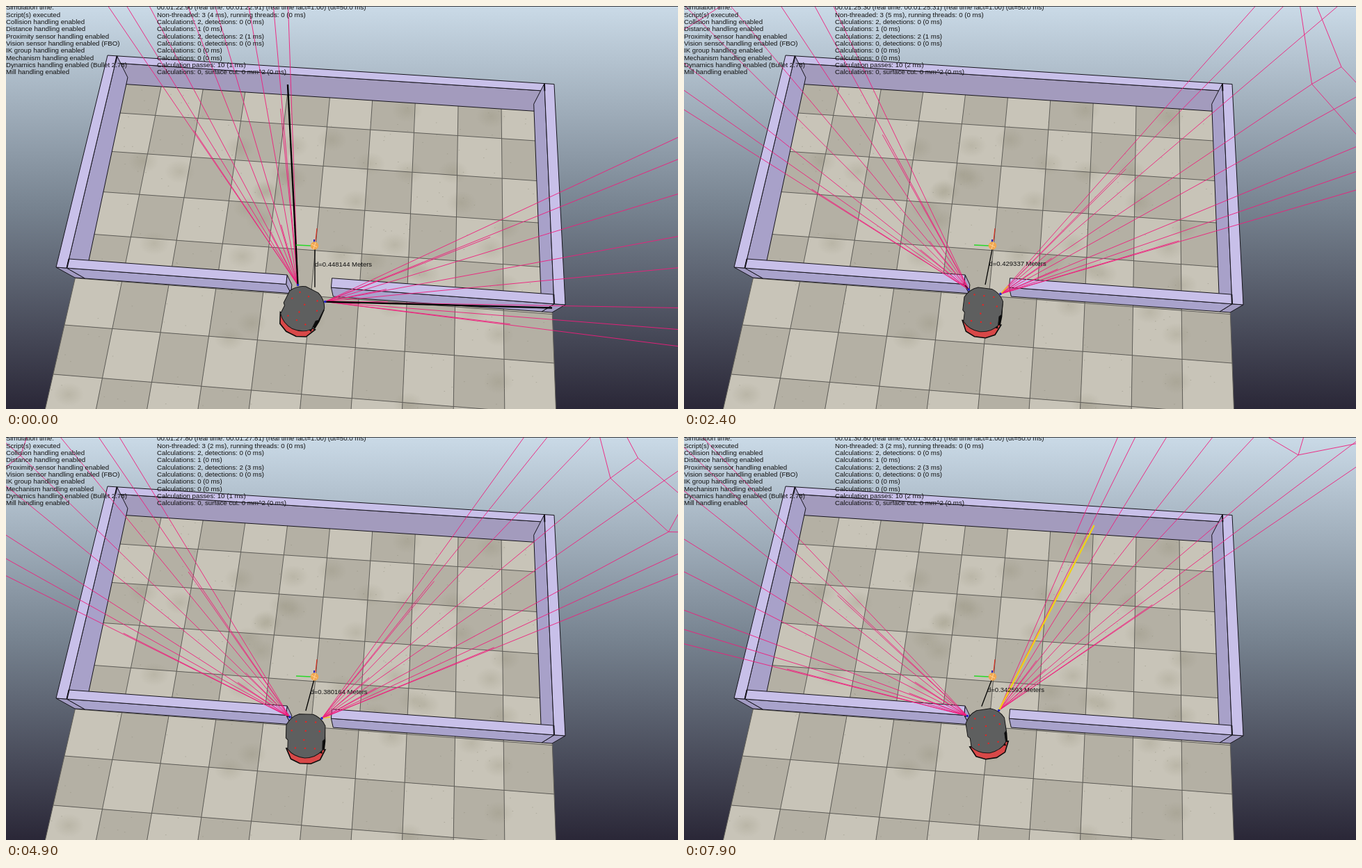
An HTML page for the animation above (8 s loop, 966x580 px).

```html
<!DOCTYPE html>
<html lang="en">
<head>
<meta charset="utf-8">
<title>Robot in a doorway</title>
<style>
html, body { margin: 0; width: 100%; height: 100%; overflow: hidden; background: #2b2838; }
svg { display: block; width: 966px; height: 580px; }
text { font: 9.7px "Liberation Sans", Arial, sans-serif; fill: #111; white-space: pre; }
</style>
</head>
<body>
<svg viewBox="0 0 966 580">
  <defs>
    <linearGradient id="sky" x2="0" y2="1">
      <stop stop-color="#cadae7"/><stop offset=".5" stop-color="#778390"/><stop offset="1" stop-color="#2a2737"/>
    </linearGradient>
    <radialGradient id="smudge">
      <stop stop-color="#88846c" stop-opacity=".22"/><stop offset="1" stop-color="#88846c" stop-opacity="0"/>
    </radialGradient>
  </defs>
  <rect width="966" height="580" fill="url(#sky)"/>
  <g id="floor"></g>
  <g id="walls" stroke="#16141c" stroke-linejoin="round"></g>
  <g id="rays" fill="none" stroke="#f01c7c" stroke-width=".9"></g>
  <g id="robot"></g>
  <g id="marker"></g>
  <g id="info"></g>
  <rect width="966" height="1" fill="#3a3d42"/>
</svg>
<script>
const LOOP = 8000, STEP = 100;
const byId = id => document.getElementById(id);
const poly = (points, fill) => `<polygon points="${points.join(' ')}" fill="${fill}"/>`;
const line = (a, b, extra = '') => `<path d="M${a}L${b}" ${extra}/>`;
const mix = (a, b, f) => a.map((x, i) => x + (b[i] - x) * f);
const rad = deg => deg * Math.PI / 180;

function randomFrom(seed) {
  return () => (seed = seed * 16807 % 2147483647) / 2147483647;
}

// Perspective map from the unit square to the corners a, b, c, d (clockwise).
function perspective(a, b, c, d) {
  const [dx1, dy1, dx2, dy2] = [b[0] - c[0], b[1] - c[1], d[0] - c[0], d[1] - c[1]];
  const sx = a[0] - b[0] + c[0] - d[0], sy = a[1] - b[1] + c[1] - d[1];
  const det = dx1 * dy2 - dx2 * dy1;
  const g = (sx * dy2 - dx2 * sy) / det, h = (dx1 * sy - sx * dy1) / det;
  return (s, t) => [0, 1].map(i =>
    ((b[i] * (1 + g) - a[i]) * s + (d[i] * (1 + h) - a[i]) * t + a[i]) / (g * s + h * t + 1));
}

function drawFloor() {
  const map = perspective([153.7, 153.3], [776, 195], [788, 514], [84, 459]);
  const at = (u, v) => map(u / 10, (v - 1) / 5);
  const random = randomFrom(7), grid = 'stroke="#605e58"';
  let out = '', specks = '';
  for (let v = 0; v < 8; v++) for (let u = 0; u < 10; u++) {
    out += poly([at(u, v), at(u + 1, v), at(u + 1, v + 1), at(u, v + 1)], (u + v) % 2 ? '#c8c4b8' : '#b4b0a4');
  }
  for (let i = 0; i < 40; i++) {
    const [x, y] = at(.4 + random() * 9.2, random() * 8);
    out += `<ellipse cx="${x}" cy="${y}" rx="22" ry="17" fill="url(#smudge)"/>`;
  }
  for (let i = 0; i < 300; i++) specks += `M${at(random() * 10, random() * 8)}h1.5`;
  for (let v = 1; v < 8; v++) out += line(at(0, v), at(10, v), grid);
  for (let u = 0; u <= 10; u++) out += line(at(u, 0), at(u, 8), grid);
  byId('floor').innerHTML = out + `<path d="${specks}" stroke="#8b8978" opacity=".45"/>`;
}

function drawWalls() {
  const top = perspective([146, 71], [788, 112.5], [804, 430], [72, 376]);
  const base = perspective([162, 102], [772, 142], [785, 441], [99, 391]);
  const area = pts => pts.reduce((sum, p, i) => {
    const q = pts[(i + 1) % pts.length];
    return sum + p[0] * q[1] - q[0] * p[1];
  }, 0);

  // A wall is a box: only the sides that face the viewer are drawn, then its top.
  const box = (s0, t0, s1, t1, frontFill) => {
    const corners = [[s0, t0], [s1, t0], [s1, t1], [s0, t1]];
    const sides = corners.map((p, i) => {
      const q = corners[(i + 1) % 4], face = [top(...q), top(...p), base(...p), base(...q)];
      return area(face) > 0 ? poly(face, i === 2 ? frontFill : '#a8a1c9') : '';
    });
    return sides.join('') + poly(corners.map(p => top(...p)), '#c8c0e9');
  };
  const a = .0215, b = .038;
  byId('walls').innerHTML =
    box(a, 0, 1 - a, b, '#a39bbd') + box(0, 0, a, 1, '#a29bc2') + box(1 - a, 0, 1, 1, '#a29bc2') +
    box(a, 1 - b, .457, 1, '#a9a3cc') + box(.5455, 1 - b, 1 - a, 1, '#a9a3cc') +
    [a, 1 - a].map(s => line(top(s, 0), top(s, b), 'stroke-width="2"') +
      line(top(s, 1 - b), top(s, 1), 'stroke-width="2"')).join('');
}

// Key poses: time, turn in degrees, body centre x and y.
const path = [
  [0, 31.5, 426, 436], [1000, 27.5, 426, 438], [2400, 8, 429, 437], [3300, 0, 429.5, 434],
  [4900, 2.2, 430.5, 430], [5900, -4.5, 432.5, 427], [7900, -10, 435, 423]
];

function poseAt(t) {
  const i = Math.max(1, path.findIndex(key => key[0] >= t)), a = path[i - 1], b = path[i];
  const [, turn, x, y] = mix(a, b, (t - a[0]) / (b[0] - a[0]));
  const c = Math.cos(rad(turn)), s = Math.sin(rad(turn));
  const mount = (dx, dy) => [x + dx * c - dy * s, y + dx * s + dy * c];
  return { turn, x, y, left: mount(-23.5, -26), right: mount(22.5, -26), nose: mount(-1, -36) };
}

// Both sensors share one fan of rays, mirrored; angles lean away from straight ahead.
const fan = [33.5, 36.5, 41.5, 48, 53, 59.5, 63, 65.7];
const innerRim = [[37, 606], [48, 540], [59.5, 566], [64, 660]];
const outerRim = [[38, 622], [48.3, 589], [56.8, 611], [61, 688]];

function drawFan(origin, side, turn) {
  const at = (deg, r) => {
    const a = rad(deg + side * turn);
    return [origin[0] + side * r * Math.sin(a), origin[1] - r * Math.cos(a)];
  };
  const ray = (deg, r) => line(origin, at(deg, r));
  let out = fan.map(deg => ray(deg, (innerRim.find(v => v[0] === deg) || [0, 1200])[1])).join('');
  out += ray(fan[1] + .6, 255) + ray(fan[7] - .3, 268) + ray(fan[3] - 1, 90) + ray(fan[5] - 1, 90);
  for (const rim of [innerRim, outerRim]) out += `<path d="M${rim.map(v => at(...v)).join('L')}"/>`;
  return out + [1, 2].map(i => line(at(...innerRim[i]), at(...outerRim[i]))).join('');
}

function drawRays({ left, right, turn }, t) {
  const reach = ([x, y], side, deg, wallY) => [x + side * (y - wallY) * Math.tan(rad(deg + side * turn)), wallY];
  const black = 'stroke="#000" stroke-width="2.3"';
  let hits;
  if (t < 1700) {
    hits = line(left, reach(left, -1, 34.4, 113), black) + line(right, [785, 434.5], black);
  } else {
    hits = line(left, [404, 402], 'stroke="#222" stroke-width="1.4"') + (t < 5400
      ? line(right, [466, 403], 'stroke="#f2c020" stroke-width="1.5"')
      : line(right, reach(right, 1, 37.2, 127), 'stroke="#f0d018" stroke-width="2.3"'));
  }
  byId('rays').innerHTML = drawFan(left, -1, turn) + drawFan(right, 1, turn) + hits;
}

function drawRobot({ x, y, turn, left, right }) {
  const at = (dx, dy, shape) => `<g transform="translate(${x + dx} ${y + dy}) rotate(${turn * .85})">${shape}</g>`;
  const sensor = ([cx, cy]) => `<circle cx="${cx}" cy="${cy}" r="1.8" fill="#2420c8"/>`;
  let dots = '';
  for (const dy of [-20, -7, 18]) for (const side of [-1, 0, 1]) {
    dots += `<rect x="${side * (dy === -7 ? 20 : 14) - 1}" y="${dy - 1}" width="2" height="2" fill="#f02020"/>`;
  }
  dots += '<rect x="-3" y="5" width="2" height="2" fill="#f02020"/>';
  byId('robot').innerHTML =
    at(1, 2, '<path d="M-28 17L-21 32L-8 38H8L21 32L28 17Z" fill="#d84848" stroke="#0c0c0c" stroke-width="1.6"/>') +
    at(2, 3, '<path d="M-27 -15H26L27 4L26 16L22 15L23 22L-25 12Z" fill="#0b0b0b"/>') +
    at(0, 0, '<path d="M-28 -15Q-22 -27 -10 -31H10Q22 -27 28 -15V4L25 7V20Q16 31 0 32Q-16 31 -25 20V7L-28 4Z" fill="#5e5f5f" stroke="#161616"/>' + dots) +
    sensor(left) + sensor(right);
}

function drawMarker({ nose }) {
  const goal = [444, 345], mid = mix(goal, nose, .5);
  const metres = Math.hypot(nose[0] - goal[0], nose[1] - goal[1]) / 133.4;
  byId('marker').innerHTML = line(goal, nose, 'stroke="#000" stroke-width="1.3"') +
    line([417, 344], [438, 345], 'stroke="#28d828" stroke-width="1.4"') +
    line([445, 338], [447, 320], 'stroke="#d83020" stroke-width="1.2"') +
    line([443, 344], [443, 336], 'stroke="#2424c0" stroke-width="2"') +
    '<circle cx="443.5" cy="345" r="5.8" fill="#f0a750"/><path d="M439 343l8 4M445 340l-3 10" stroke="#ffd39a"/>' +
    `<text x="${mid[0]}" y="${mid[1] + .5}" style="font-size:9.5px">d=${metres.toFixed(6)} Meters</text>`;
}

function drawInfo(t) {
  const random = randomFrom(t * 31 + 977);
  random();
  const cost = (low, span) => low + Math.floor(random() * span);
  const clock = extra => {
    const c = 2290 + t / 10 + extra;
    return `00:01:${Math.floor(c / 100)}:${String(c % 100).padStart(2, '0')}`;
  };
  const found = (count, hits, ms) => `Calculations: ${count}, detections: ${hits} (${ms} ms)`;
  const rows = [
    ['Simulation time:', `${clock(0)} (real time: ${clock(1)}) (real time fact=1.00) (dt=50.0 ms)`],
    ['Script(s) executed', `Non-threaded: 3 (${cost(2, 4)} ms), running threads: 0 (0 ms)`],
    ['Collision handling enabled', found(2, 0, 0)],
    ['Distance handling enabled', 'Calculations: 1 (0 ms)'],
    ['Proximity sensor handling enabled', found(2, 2, cost(1, 3))],
    ['Vision sensor handling enabled (FBO)', found(0, 0, 0)],
    ['IK group handling enabled', 'Calculations: 0 (0 ms)'],
    ['Mechanism handling enabled', 'Calculations: 0 (0 ms)'],
    ['Dynamics handling enabled (Bullet 2.78)', `Calculation passes: 10 (${cost(1, 2)} ms)`],
    ['Mill handling enabled', 'Calculations: 0, surface cut: 0 mm^2 (0 ms)']
  ];
  byId('info').innerHTML = rows.map(([name, value], i) => {
    const y = 5.3 + i * 10.33;
    return `<text x="0" y="${y}">${name}</text><text x="217" y="${y}">${value}</text>`;
  }).join('');
}

function render(ms) {
  const t = Math.floor(ms % LOOP / STEP) * STEP, pose = poseAt(t);
  drawRays(pose, t);
  drawRobot(pose);
  drawMarker(pose);
  drawInfo(t);
}

drawFloor();
drawWalls();
const start = performance.now();
let shown = -1;
function tick() {
  const ms = Math.max(0, performance.now() - start), step = Math.floor(ms / STEP);
  if (step !== shown) render(ms);
  shown = step;
  requestAnimationFrame(tick);
}
tick();
</script>
</body>
</html>
```
